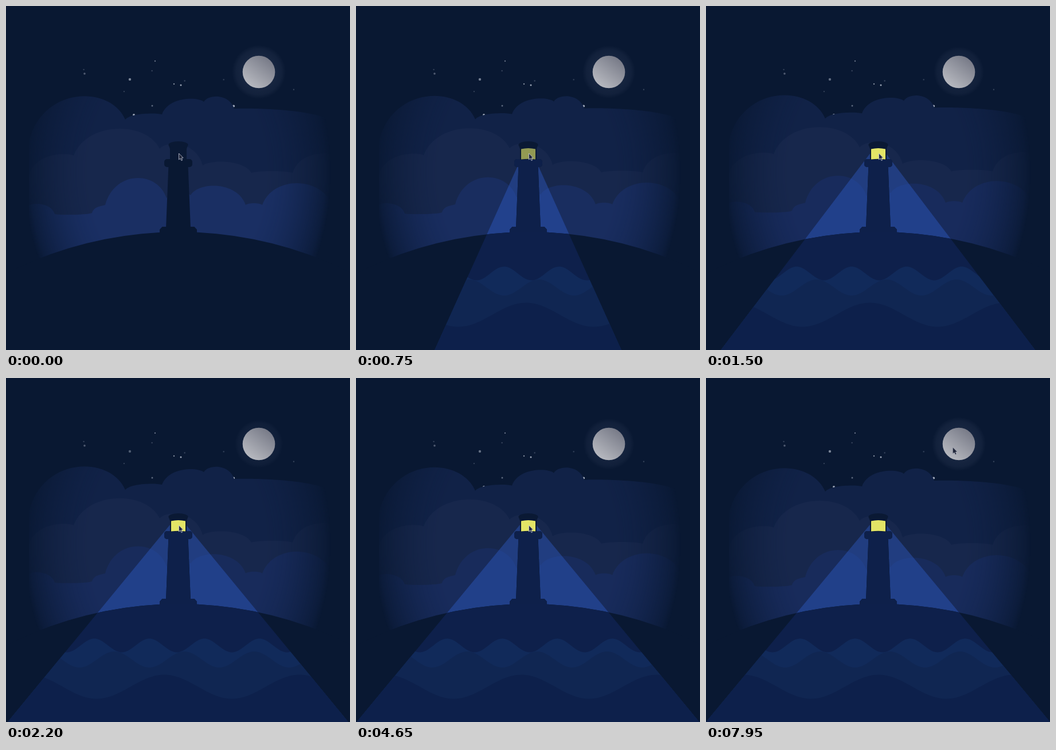
An HTML page with a canvas that plays this animation: 600 by 600 pixels, repeating every 8 s.

```html
<!DOCTYPE html>
<html lang="en">
<head>
<meta charset="utf-8">
<title>Lighthouse at night</title>
<style>
html, body { margin: 0; width: 100%; height: 100%; overflow: hidden; background: #091832; }
canvas { display: block; width: 100vw; height: 100vh; }
</style>
</head>
<body>
<canvas id="stage" width="600" height="600"></canvas>
<script>
const SIZE = 600, LOOP = 8000, AXIS = 300.5, TAU = Math.PI * 2;
const NIGHT = '#091832', LIT = '#0e204b';
const ctx = document.getElementById('stage').getContext('2d');
const layer = document.createElement('canvas');
layer.width = layer.height = SIZE;
const sky = layer.getContext('2d');

const clamp = v => Math.max(0, Math.min(1, v));
const mix = (a, b, k) => a + (b - a) * k;
const smooth = k => k * k * (3 - 2 * k);
const noise = n => Math.abs(Math.sin(n * 127.1) * 43758.5) % 1;

function disc(x, y, r, fill) {
  ctx.fillStyle = fill;
  ctx.beginPath();
  ctx.arc(x, y, r, 0, TAU);
  ctx.fill();
}

function star(x, y, r, alpha) {
  disc(x, y, r, `rgba(215,222,235,${alpha})`);
}

function drawStars(sway) {
  star(216, 128, 2.2, .55 - .25 * sway);
  star(223, 190, 1.9, .75);
  star(397, 174.5, 2.1, .75);
  star(293, 136, 1.2, .6);
  star(305, 138, 1.5, .7);
  star(260, 96, 1.2, .45);
  star(255, 174, 1.5, .4);
  star(137, 118, 1.8, .35);
  // faint scatter
  for (let i = 0; i < 7; i++) {
    star(130 + 60 * i + 20 * noise(i + 1), 100 + 50 * noise(i + 9), 1.2, .22);
  }
}

function drawMoon(sway) {
  const x = 441, y = 115, r = 47 - 6 * sway, a = .09 - .04 * sway;
  const halo = ctx.createRadialGradient(x, y, 26, x, y, r);
  halo.addColorStop(0, `rgba(170,180,215,${a})`);
  halo.addColorStop(.65, `rgba(170,180,215,${a * .65})`);
  halo.addColorStop(1, 'rgba(170,180,215,0)');
  disc(x, y, r, halo);
  const face = ctx.createLinearGradient(x + 18, y - 22, x - 16, y + 22);
  face.addColorStop(0, '#787b88');
  face.addColorStop(1, '#b5b7be');
  disc(x, y, 28.3, face);
}

// Each lump runs to [x, y] and bulges up to the height of its crown.
function cloud(x0, y0, rise, fill, lumps) {
  sky.save();
  sky.translate(0, -rise);
  sky.fillStyle = fill;
  sky.beginPath();
  sky.moveTo(x0, 480);
  sky.lineTo(x0, y0);
  for (const [x, y, crown] of lumps) {
    const cy = (crown - (y0 + y) / 8) / .75, inset = (x - x0) * .15;
    sky.bezierCurveTo(x0 + inset, cy, x - inset, cy, x, y);
    [x0, y0] = [x, y];
  }
  sky.lineTo(x0, 480);
  sky.fill();
  sky.restore();
}

function drawClouds(sway, power) {
  sky.clearRect(0, 0, SIZE, SIZE);
  cloud(40, 235, 3.5 * sway, '#112247',
    [[208, 198, 158], [272, 189, 188], [345, 167, 163], [398, 179, 158], [580, 208, 182]]);
  cloud(40, 295, 5 * sway, '#17274c',
    [[118, 261, 261], [268, 249, 214], [343, 278, 242], [428, 291, 272], [500, 291, 288], [575, 262, 259]]);
  cloud(40, 348, 7.5 * sway, `rgb(${mix(26, 24, power)},${mix(47, 43, power)},${mix(99, 91, power)})`,
    [[85, 363, 346], [150, 361, 364], [173, 347, 350], [280, 335, 300],
     [322, 330, 325], [418, 347, 314], [447, 347, 344], [570, 350, 309]]);

  // soft oval vignette
  sky.save();
  sky.globalCompositeOperation = 'destination-in';
  sky.translate(299, 290);
  sky.scale(1, 1.32);
  const fade = sky.createRadialGradient(0, 0, 0, 0, 0, 268);
  for (let k = 0; k <= 10; k++) {
    const alpha = smooth(1 - k / 10) * .6 + .4 * (1 - k / 10);
    fade.addColorStop(.58 + .042 * k, `rgba(0,0,0,${Math.sqrt(alpha)})`);
  }
  sky.fillStyle = fade;
  sky.fillRect(-400, -400, 800, 800);
  sky.restore();
  ctx.drawImage(layer, 0, 0);
}

function beamPath(half) {
  ctx.beginPath();
  ctx.moveTo(300, 239);
  ctx.lineTo(300 + half, SIZE);
  ctx.lineTo(300 - half, SIZE);
  ctx.closePath();
}

function hill(fill) {
  disc(302, 1058, 664, fill);
}

function wave(crest, length, middle, height, fill) {
  ctx.fillStyle = fill;
  ctx.beginPath();
  ctx.moveTo(0, SIZE);
  for (let x = 0; x <= SIZE; x += 4) {
    ctx.lineTo(x, middle - height * Math.cos((x - crest) / length * TAU));
  }
  ctx.lineTo(SIZE, SIZE);
  ctx.fill();
}

function drawSea(half, sway, light) {
  ctx.save();
  beamPath(half);
  ctx.clip();
  ctx.globalAlpha = light;
  hill(LIT);
  wave(260 - 12 * sway, 96, 466.5, 12, '#112a5a');
  wave(321 - 12 * sway, 122, 491, 14, '#102652');
  wave(301 - 30 * sway, 236, 538.5, 21, '#0d204b');
  ctx.restore();
}

// Symmetric block with chamfered or slanted sides.
function block(top, topHalf, bottom, bottomHalf) {
  ctx.beginPath();
  ctx.moveTo(AXIS - topHalf, top);
  ctx.lineTo(AXIS + topHalf, top);
  ctx.lineTo(AXIS + bottomHalf, bottom);
  ctx.lineTo(AXIS - bottomHalf, bottom);
  ctx.fill();
}

function drawBody(fill) {
  ctx.fillStyle = fill;
  block(278, 17, 388, 21.5);
  block(385, 28, 390, 32.5);
  block(390, 32.5, 395, 32.5);
  ctx.beginPath();
  ctx.roundRect(AXIS - 24.5, 267, 49, 14, 5);
  ctx.fill();
}

function drawTower(light, lamp) {
  drawBody(NIGHT);
  ctx.globalAlpha = light;
  drawBody('#0e204a');
  ctx.globalAlpha = 1;

  ctx.fillStyle = '#0a1934';
  block(242, 17, 249, 14.5);
  block(249, 14.5, 268, 14.5);
  ctx.beginPath();
  ctx.ellipse(AXIS, 242, 17, 6, 0, 0, TAU);
  ctx.fill();

  ctx.globalAlpha = lamp;
  ctx.fillStyle = '#e3e566';
  ctx.beginPath();
  ctx.moveTo(288, 267.5);
  ctx.lineTo(288, 249.5);
  ctx.quadraticCurveTo(AXIS, 246.5, 313, 249.5);
  ctx.lineTo(313, 267.5);
  ctx.quadraticCurveTo(AXIS, 266, 288, 267.5);
  ctx.fill();
  ctx.globalAlpha = 1;
}

function drawCursor(t) {
  const go = smooth(clamp((t - 5450) / 350)), settle = clamp((t - 6050) / 150);
  ctx.save();
  ctx.translate(mix(301.5, 434, go) - 3.5 * settle, mix(257, 119, go) + 2 * settle);
  const arrow = new Path2D('M0 0V11L2.6 8.8 4.4 12.6 6.2 11.8 4.5 8.1 7.6 7.8Z');
  ctx.fillStyle = '#20263a';
  ctx.fill(arrow);
  ctx.lineWidth = .9;
  ctx.strokeStyle = `rgba(205,210,225,${mix(.85, .3, go)})`;
  ctx.stroke(arrow);
  ctx.restore();
}

function draw(t) {
  const power = Math.sin(clamp((t - 20) / 1980) * Math.PI / 2);
  const sway = t < 6000 ? (1 - Math.cos(t / 3000 * Math.PI)) / 2 : 0;
  const light = clamp(t / 300);
  const half = 297 * power + (t > 3000 ? 3 * (1 - sway) : 0);

  ctx.fillStyle = NIGHT;
  ctx.fillRect(0, 0, SIZE, SIZE);
  drawStars(sway);
  drawMoon(sway);
  drawClouds(sway, power);

  ctx.globalAlpha = light;
  beamPath(half);
  ctx.fillStyle = 'rgba(50,100,218,.36)';
  ctx.fill();
  ctx.globalAlpha = 1;

  hill(NIGHT);
  drawSea(half, sway, light);
  drawTower(light, clamp(power * 1.15));
  drawCursor(t);
}

function tick() {
  draw(performance.now() % LOOP);
  requestAnimationFrame(tick);
}
tick();
</script>
</body>
</html>
```
